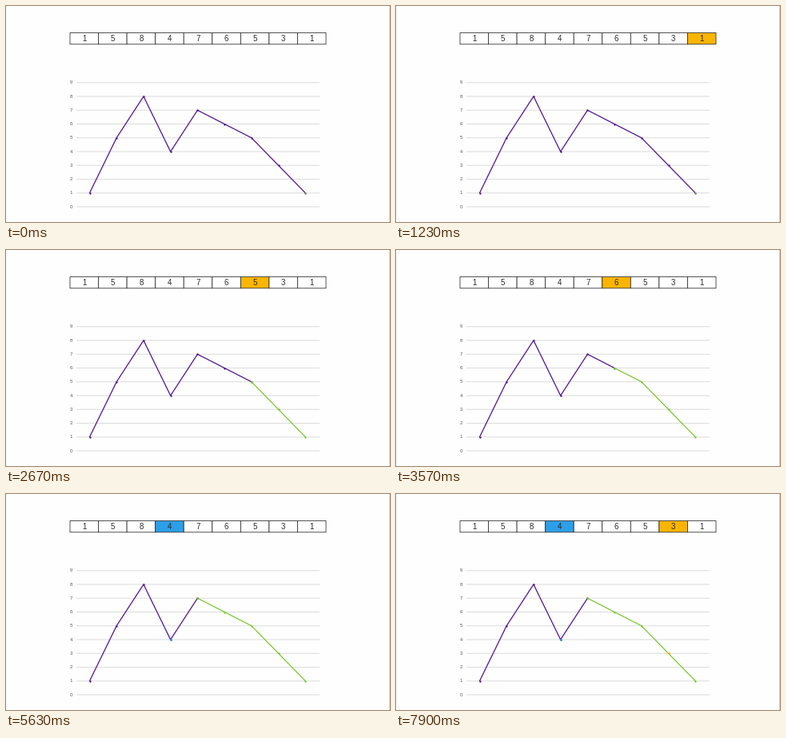
These frames come from a looping animation (480x270 px, 8000 ms). A matplotlib script:

```python
import matplotlib.pyplot as plt
from matplotlib.animation import FuncAnimation
from matplotlib.patches import Rectangle

W, H, DPI = 480, 270, 100
PX = 72 / DPI
FRAMES, INTERVAL = 160, 50

VALUES = [1, 5, 8, 4, 7, 6, 5, 3, 1]
N = len(VALUES)
PIVOT = 3

PURPLE, GREEN = "#541c8e", "#80c73a"
ORANGE, BLUE = "#fbb500", "#2c9fe8"
INK, LABEL, GRID = "#2a2a2a", "#5e5e5e", "#dcdcdc"

# (start ms, scanned cell, first cell of the green tail, pivot found)
STEPS = [
    (0, None, 8, False),
    (500, 8, 8, False),
    (1500, 7, 7, False),
    (2500, 6, 6, False),
    (3500, 5, 5, False),
    (4500, 4, 4, False),
    (5550, None, 4, True),
    (6600, 8, 4, True),
    (7600, 7, 4, True),
]

LEFT, TOP, RIGHT, BOTTOM = 80, 33.5, 400, 47.8
CELL = (RIGHT - LEFT) / N


def level(v):
    return 251 - 17.25 * v


xs = [104.5 + 33.72 * i for i in range(N)]
ys = [level(v) for v in VALUES]

fig = plt.figure(figsize=(W / DPI, H / DPI), dpi=DPI, facecolor="#fefefe")
ax = fig.add_axes([0, 0, 1, 1])
ax.set_xlim(0, W)
ax.set_ylim(H, 0)
ax.axis("off")


def line(x, y, color, width=1.0, **kw):
    return ax.plot(x, y, color=color, lw=width * PX, snap=False, **kw)[0]


def text(x, y, s, size, color):
    ax.text(x, y, s, fontsize=size * PX, color=color, ha="center",
            va="center_baseline", family="Liberation Sans", zorder=6)


# slide edge
line([479.5, 479.5], [0, H], "#c9c9c9")
line([0.5, 0.5], [0, H], "#f1f1f1")

# chart
for v in range(10):
    line([88, 392], [level(v)] * 2, GRID, solid_capstyle="butt")
    text(81.6, level(v) - 0.3, str(v), 6.3, LABEL)

style = dict(solid_joinstyle="round", solid_capstyle="round",
             marker="o", markersize=2.4 * PX, markeredgewidth=0)
head = line([], [], PURPLE, 1.3, zorder=3, **style)
tail = line([], [], GREEN, 1.3, zorder=4, **style)
dots = [line([], [], c, 0, marker="o", markersize=2.7 * PX,
             markeredgewidth=0, zorder=5) for c in (ORANGE, BLUE)]

# table
cells = []
for i, v in enumerate(VALUES):
    box = Rectangle((LEFT + i * CELL, TOP), CELL, BOTTOM - TOP, snap=False,
                    facecolor="white", edgecolor=INK, lw=0.8 * PX, zorder=3)
    cells.append(ax.add_patch(box))
    text(LEFT + (i + 0.5) * CELL, (TOP + BOTTOM) / 2 - 0.2, str(v), 9.8, INK)


def place(dot, i):
    dot.set_data([], []) if i is None else dot.set_data([xs[i]], [ys[i]])


def draw(frame):
    now = frame * INTERVAL
    _, scan, first, found = [s for s in STEPS if s[0] <= now][-1]
    for i, box in enumerate(cells):
        color = ORANGE if i == scan else BLUE if found and i == PIVOT else "white"
        box.set_facecolor(color)
    head.set_data(xs[:first + 1], ys[:first + 1])
    tail.set_data(xs[first:], ys[first:])
    place(dots[0], scan if found else None)
    place(dots[1], PIVOT if found else None)
    return [*cells, head, tail, *dots]


anim = FuncAnimation(fig, draw, frames=FRAMES, interval=INTERVAL,
                     repeat=True, repeat_delay=0, blit=False)
plt.show()
```
